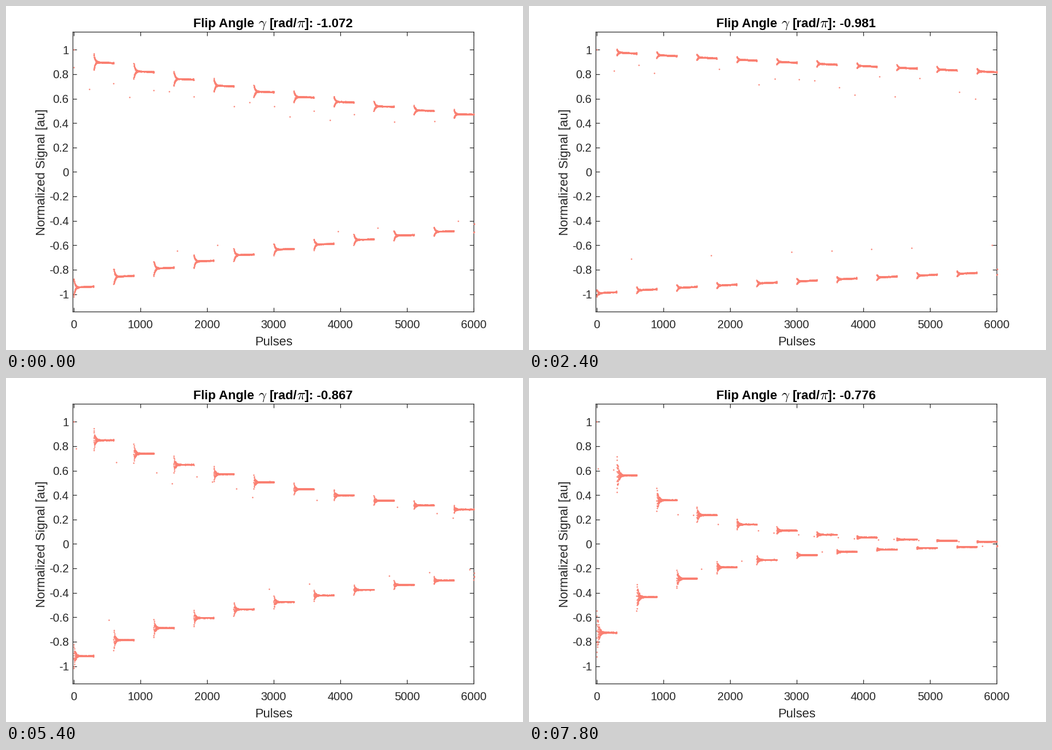
A matplotlib script that plays this animation: 900x600 px, repeating every 8 s.

```python
import numpy as np
import matplotlib.pyplot as plt
from matplotlib.animation import FuncAnimation

W, H, DPI = 900, 600, 100
FRAMES, INTERVAL = 40, 200
PT = 72 / DPI  # points per pixel
BLOCK = 300    # pulses between two flips
INK = "#262626"
SALMON = "#fa8072"

plt.rcParams["font.family"] = "Liberation Sans"
plt.rcParams["mathtext.fontset"] = "cm"

# Log loss after six blocks at a few steps of the sweep
STEPS = np.array([0, 4, 12, 19, 27, 31, 39])
LOSS = np.array([.274, .170, .067, .168, .431, .787, 1.435])
SLOPE = np.gradient(LOSS, STEPS, edge_order=2)


def loss_at(i):
    """Cubic Hermite curve through the key points."""
    k = min(np.searchsorted(STEPS, i, "right") - 1, len(STEPS) - 2)
    h = STEPS[k + 1] - STEPS[k]
    t = (i - STEPS[k]) / h
    return ((1 + 2 * t) * (1 - t) ** 2 * LOSS[k]
            + t * (1 - t) ** 2 * h * SLOPE[k]
            + t * t * (3 - 2 * t) * LOSS[k + 1]
            + t * t * (t - 1) * h * SLOPE[k + 1])


def levels(i):
    """Plateau height of each block."""
    loss = loss_at(i)
    blocks = np.arange(1, 22)
    power = .87 + .04 * np.sin(2 * np.pi * (i - 8) / 46)
    level = np.exp(-loss * (blocks / 6) ** power)
    level[2::2] *= 1 - .022 * loss
    return level


def block_profile(i):
    """Ringing that settles to a plateau within one block."""
    n = np.arange(BLOCK)
    size = .205 * loss_at(i) ** .75
    detune = .08 * np.clip((i - 8) / 31, .1, 1)
    phase = np.pi / 4 * np.clip((20 - i) / 8, 0, 1)
    decay = 18 + 100 * detune
    tilt = .009 * np.clip((27 - i) / 14, 0, 1)
    ripple = (size / np.cos(phase) * np.exp(-n / decay)
              * np.cos((np.pi / 2 + detune) * n + phase))
    tail = .006 * (-1.0) ** n * np.exp((n - BLOCK + 1) / 5)
    return 1 + ripple + tail + tilt * (.5 - n / BLOCK)


def strays(i, level, rng):
    """Lone pulses that recur in every pair of blocks."""
    drift = 42 * np.sin(np.pi * i / 45)
    late = drift > 20
    lower = (drift + 485, .45, [-.73]) if late else (drift + 355, .45, [-.85])
    series = [(drift, .95, [.85, .85, .85, .79, .91]),
              (drift + 234, .6, [.72, .72, .84]),
              lower]
    points = [(0, 1.0)]
    for offset, chance, shares in series:
        for pair in range(10):
            if rng.random() < chance:
                x = 2 * BLOCK * pair + offset + pair
                points.append((x, rng.choice(shares) * level[int(x // BLOCK)]))
    return np.array(points)


def signal(i):
    rng = np.random.default_rng(100 + i)
    level = levels(i)
    sign = np.where(np.arange(level.size) % 2, 1, -1)
    y = np.outer(sign * level, block_profile(i)).ravel()[:20 * BLOCK + 4]
    y += rng.normal(0, .0012, y.size)
    pulses = np.column_stack([np.arange(y.size), y])
    return np.vstack([pulses, strays(i, level, rng)])


fig = plt.figure(figsize=(W / DPI, H / DPI), dpi=DPI, facecolor="white")
L, R, T, B = 116.4, 814.4, 45.4, 533.4
X0, X1, Y1 = -11, 6000, 1.145
ax = fig.add_axes([L / W, 1 - B / H, (R - L) / W, (B - T) / H])
ax.set_xlim(X0, X1)
ax.set_ylim(-Y1, Y1)
ax.set_xticks(range(0, 6001, 1000))
ax.set_yticks(np.arange(-5, 6) / 5)
ax.tick_params(direction="in", top=True, right=True, length=7 * PT,
               width=1.2 * PT, color=INK, labelbottom=False, labelleft=False)
for spine in ax.spines.values():
    spine.set(linewidth=1.2 * PT, color=INK)


def label(x, y, s, px=22, color=INK, **kw):
    return fig.text(x / W, 1 - y / H, s, fontsize=px * PT, color=color,
                    va="baseline", **kw)


for v in range(0, 6001, 1000):
    label(L + (v - X0) * (R - L) / (X1 - X0), 562.5, str(v), 20, ha="center")
for v in np.arange(-5, 6) / 5:
    label(109.5, 296.8 - v * (B - T) / (2 * Y1), f"{v:g}", 20, ha="right")
label(466, 591.5, "Pulses", ha="center")
label(68, 289.5, "Normalized Signal [au]", ha="center", rotation=90,
      rotation_mode="anchor")

for x, s in ((325.5, "Flip Angle"), (458.5, "[rad/")):
    label(x, 36.5, s, 22.2, "black", weight="bold")
for x, s in ((439, r"$\gamma$"), (506, r"$\pi$")):
    label(x, 36.5, s, 24.5, "black")
value = label(519.5, 36.5, "", 22.2, "black", weight="bold")

dots, = ax.plot([], [], "o", ms=2.5 * PT, mfc=SALMON, mec="none",
                clip_on=False, zorder=3)


def draw(i):
    dots.set_data(*signal(i).T)
    value.set_text(f"]: {-1.0722 + .00759 * i:.3f}")
    return dots, value


anim = FuncAnimation(fig, draw, frames=FRAMES, interval=INTERVAL,
                     repeat=True, repeat_delay=0, blit=False)
plt.show()
```
